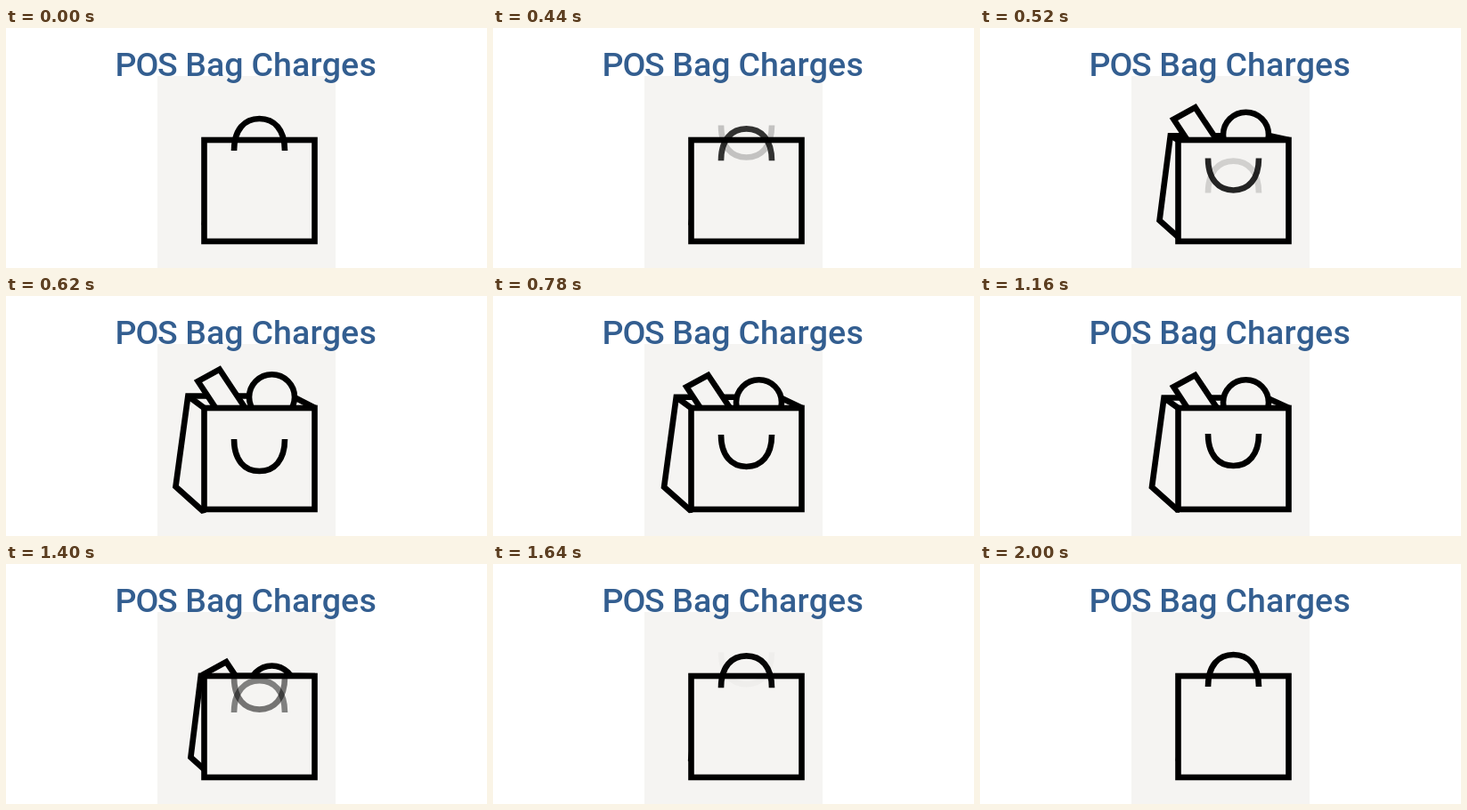
Write an HTML page that moves like this. It is 540 px wide and 270 px high and loops after 2.02 s.

```html
<!DOCTYPE html>
<html lang="en">
<head>
<meta charset="utf-8">
<title>POS Bag Charges</title>
<style>
  html, body { margin: 0; width: 100%; height: 100%; overflow: hidden; background: #fff; }
  svg { display: block; width: 540px; height: 270px; }
  .ink { fill: #f5f4f2; stroke: #000; stroke-width: 6.6; }
  .line { fill: none; }
  .title { font: 500 37.5px Roboto, Inter, sans-serif; fill: #335e90; }
</style>
</head>
<body>
<svg viewBox="0 0 540 270">
  <rect x="170" y="54" width="200" height="216" fill="#f5f4f2"/>
  <text class="title" y="54.4"><tspan x="122.6" letter-spacing="-1.2">POS</tspan><tspan x="201.3">Bag</tspan><tspan x="275.4" letter-spacing=".2">Charges</tspan></text>

  <polyline id="back" class="ink"/>
  <polyline id="fold" class="ink line"/>
  <path id="box" class="ink" d="M252 155 L217.3 102.3 L241.5 89 L280 147"/>
  <circle id="ball" class="ink" cx="298.5" cy="119.8" r="25.5"/>
  <rect class="ink" x="222.5" y="126" width="124" height="114"/>
  <path id="up" class="ink line" d="M256 138 C256 114 268 102 284.5 102 S313 114 313 138"/>
  <path id="down" class="ink line" d="M256 155 C256 179 268 191 284.5 191 S313 179 313 155"/>
</svg>
<script>
const LOOP = 2020, OPEN = 420, CLOSE = 1350;
const OPEN_TIME = 740, CLOSE_TIME = 540;

const $ = id => document.getElementById(id);
const clamp = v => Math.min(1, Math.max(0, v));
const mix = (a, b, p) => a + (b - a) * p;

const elasticOut = (t, period) => t <= 0 ? 0 : t >= 1 ? 1 :
  1 + 2 ** (-10 * t) * Math.sin((t - period / 4) * 2 * Math.PI / period);
const expoOut = t => t >= 1 ? 1 : 1 - 2 ** (-10 * t);

// How far a part is open: springs out, then glides back.
function openness(ms, period, delay) {
  if (ms >= CLOSE) return 1 - expoOut((ms - CLOSE) / CLOSE_TIME);
  return elasticOut((ms - OPEN - delay) / OPEN_TIME, period);
}

// Bag corners as [closed x, closed y, open x, open y]
const corners = {
  bottomRight: [235, 231, 221.5, 240.5],
  bottomLeft: [223, 220, 193, 215],
  topLeft: [232, 138, 206.5, 114.5],
  topRight: [334, 138, 322, 114.5]
};
const corner = (name, p) => {
  const [x0, y0, x1, y1] = corners[name];
  return [mix(x0, x1, p), mix(y0, y1, p)];
};

function move(id, x, y) {
  $(id).setAttribute("transform", `translate(${x} ${y})`);
}

function draw(ms) {
  const side = openness(ms, .75, 20);
  const items = openness(ms, .35, 37);
  const handle = openness(ms, .73, 0);
  const shown = clamp(handle);

  const outline = Object.keys(corners).map(name => corner(name, side));
  $("back").setAttribute("points", [[224, 240.5], ...outline, [347, 126]].join(" "));
  $("fold").setAttribute("points", [corner("topLeft", side), [222.5, 126]].join(" "));

  move("box", 12 * (1 - items), 44 * (1 - items));
  move("ball", 0, 42 * (1 - items));

  move("up", 0, 56 * handle);
  move("down", 0, 57 * (handle - 1));
  $("up").setAttribute("opacity", 1 - shown);
  $("down").setAttribute("opacity", shown);
}

const start = performance.now();
function tick() {
  draw((performance.now() - start) % LOOP);
  requestAnimationFrame(tick);
}
tick();
</script>
</body>
</html>
```
